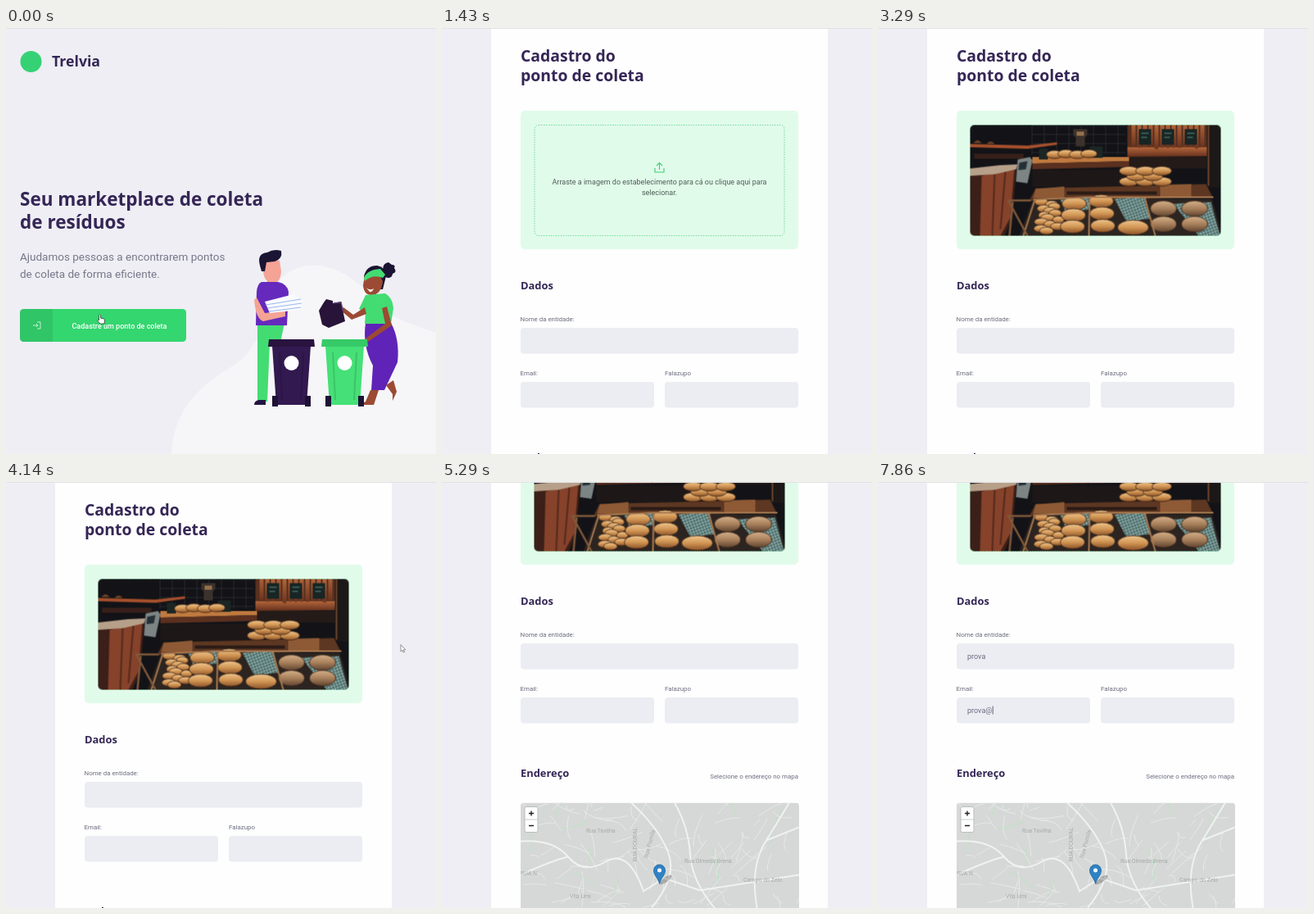
An HTML page for the animation above (8000 ms loop, 525x520 px).

```html
<!DOCTYPE html>
<html lang="pt">
<head>
<meta charset="utf-8">
<title>Ponto de coleta</title>
<style>
html, body { margin: 0; width: 100%; height: 100%; overflow: hidden; background: #eeeef4; }
svg { display: block; }
text { font-family: Roboto, sans-serif; }
.h { font-family: "Noto Sans", sans-serif; font-weight: 700; fill: #352656; }
.small { font-size: 7.9px; fill: #6c6c80; }
.field { fill: #ececf3; }
.typed { font-size: 9px; fill: #6c6c80; }
.street { font-size: 7px; fill: #a4aaa8; }
#home, #form, #scroll, #photo, #hand, #arrow { animation: 8s step-end infinite; }
#home { animation-name: home; }
#form { animation-name: form; }
#scroll { animation-name: scroll; }
#photo { animation-name: photo; }
#hand { animation-name: hand; }
#arrow { animation-name: arrow; }
@keyframes home { 0% { opacity: 1 } 3.5%, 100% { opacity: 0 } }
@keyframes form { 0% { opacity: 0 } 3.5%, 100% { opacity: 1 } }
@keyframes photo { 0% { opacity: 0 } 35.7%, 100% { opacity: 1 } }
@keyframes scroll {
  0% { transform: translateY(0) }
  12.4% { transform: translateY(-20px) }
  14.2% { transform: translateY(-58px) }
  16% { transform: translateY(-97px) }
  17.7% { transform: translateY(-113px) }
  58.8% { transform: translateY(-130px) }
  60.6% { transform: translateY(-172px) }
  62.4% { transform: translateY(-220px) }
  64.2% { transform: translateY(-264px) }
  66%, 100% { transform: translateY(-282px) }
}
@keyframes hand {
  0% { transform: translate(111px, 349px); opacity: 1 }
  1.7% { transform: translate(117px, 352px); opacity: 1 }
  5.3% { transform: translate(126px, 356px); opacity: 1 }
  7% { transform: translate(130px, 357px); opacity: 1 }
  17.7%, 100% { transform: translate(130px, 357px); opacity: 0 }
}
@keyframes arrow {
  0% { transform: translate(468px, 203px); opacity: 0 }
  49.9% { transform: translate(468px, 203px); opacity: 1 }
  51.6% { transform: translate(482px, 198px); opacity: 1 }
  58.8%, 100% { transform: translate(482px, 198px); opacity: 0 }
}
</style>
</head>
<body>
<svg width="525" height="520" viewBox="0 0 525 520">
<defs>
  <g id="brand">
    <circle cx="30.5" cy="41" r="13" fill="#35d275"/>
    <text class="h" x="56" y="47" font-size="17.7">Trelvia</text>
  </g>
  <clipPath id="photoClip"><rect width="306" height="135" rx="5"/></clipPath>
  <clipPath id="mapClip"><rect width="340" height="197" rx="4"/></clipPath>
  <pattern id="cloth" width="5" height="5" patternUnits="userSpaceOnUse" patternTransform="rotate(25)">
    <rect width="5" height="5" fill="#42605f"/><path d="M0 0h2.500v2.500h-2.500zM2.500 2.500h2.500v2.500h-2.500z" fill="#8fb0ab"/>
  </pattern>
  <pattern id="tiles" width="15" height="11" patternUnits="userSpaceOnUse">
    <path d="M0 .5h15M.5 0v11" stroke="#2b2c32" stroke-width=".8"/>
  </pattern>
  <linearGradient id="crust" x2="0" y2="1">
    <stop stop-color="#efc78f"/><stop offset=".5" stop-color="#d29654"/><stop offset="1" stop-color="#8a5228"/>
  </linearGradient>
  <linearGradient id="rye" x2="0" y2="1">
    <stop stop-color="#d3b08a"/><stop offset=".5" stop-color="#a8805b"/><stop offset="1" stop-color="#5e4330"/>
  </linearGradient>
  <linearGradient id="wood" x2="0" y2="1">
    <stop stop-color="#b3663a"/><stop offset="1" stop-color="#6b3420"/>
  </linearGradient>
</defs>
<rect width="525" height="520" fill="#eeeef4"/>

<g id="home">
  <path d="M202 520C204 468 236 436 276 413C322 386 314 324 341 301C376 274 424 298 450 333C470 357 500 362 525 372V520Z" fill="#f6f6f8"/>
  <use href="#brand"/>
  <text class="h" font-size="22.5"><tspan x="17" y="217">Seu marketplace de coleta</tspan><tspan x="17" y="245">de resíduos</tspan></text>
  <text font-size="13.5" fill="#77778a"><tspan x="17" y="284">Ajudamos pessoas a encontrarem pontos</tspan><tspan x="17" y="305">de coleta de forma eficiente.</tspan></text>
  <rect x="17" y="343" width="203" height="40" rx="4.5" fill="#34d66f"/>
  <path d="M57 343V383H21.500q-4.500 0-4.500-4.500V347.500q0-4.500 4.500-4.500z" fill="#000" opacity=".08"/>
  <path d="M38 359h4v8h-4M33 363h6M37 361l2 2l-2 2" fill="none" stroke="#fff" stroke-width=".9" opacity=".8"/>
  <text x="138.500" y="366.500" font-size="9" font-weight="500" fill="#fff" text-anchor="middle">Cadastre um ponto de coleta</text>

  <!-- man -->
  <path d="M307 360h33l-5 24h-13l-3 72h-12z" fill="#43dc73"/>
  <path d="M303 460q0-5 6-6h8v6z" fill="#241440"/>
  <path d="M319 303h10v12h-10z" fill="#e88a7a"/>
  <path d="M314 284h20l2 13q-1 14-9 14q-12 0-13-14z" fill="#f5a394"/>
  <path d="M310 290q-4-15 9-16q8-5 17-2q2 10-8 13l-10 1l-2 11h-4z" fill="#1b1433"/>
  <path d="M312 310h20q11 2 13 12l-2 41h-38l1-41q1-10 6-12z" fill="#6529bd"/>
  <path d="M306 329l10 19l25-3v7l-27 6q-9-3-11-26z" fill="#f5a394"/>
  <path d="M316 334l35-9l11 9l-3 10l-37 4z" fill="#fafbff"/>
  <path d="M317 338l43-7M319 342l42-6M321 346l39-5" stroke="#9ab8e8" stroke-width="1.200"/>

  <!-- woman -->
  <path d="M460 295q0-8 7-9l4 3q5 0 3 4q4 5-2 7q-1 7-9 4z" fill="#1b1433"/>
  <path d="M437 303q3-13 16-13q11 2 11 13l-4 16h-17z" fill="#1b1433"/>
  <path d="M438 302h18l4 7q-2 17-14 17q-9 0-10-12z" fill="#9c4a33"/>
  <path d="M437 305q4-10 20-11l6 7l-3 4q-12-5-22 4z" fill="#43dc73"/>
  <path d="M440 317q4 4 9 1q-2 5-5 4z" fill="#fff"/>
  <path d="M439 360h31q11 20 8 48l-16 34h-16l2-30q-13-24-9-52z" fill="#5f23b7"/>
  <path d="M445 442l-6 14l-7 4h17l6-18M464 436l8 11v8l5-11l-4-14" fill="#9c4a33"/>
  <path d="M439 326l24-2q9 5 10 18l-3 19h-32l1-14l-8-4z" fill="#43dc73"/>
  <path d="M438 341l-14 9l-12-9l-4 3l14 12l18-7z" fill="#9c4a33"/>
  <path d="M465 340l6 23l-29 20l-3-4l24-18l-4-19z" fill="#9c4a33"/>
  <path d="M382 345l6-10l3-4l8 2v3l10-2l5 24l-20 8l-8-4z" fill="#271438"/>
  <path d="M400 336l9 -1l3 13" fill="none" stroke="#5a3f72" stroke-width="1.500"/>

  <g id="bins"></g>
</g>

<g id="form"><g id="scroll">
  <use href="#brand"/>
  <path d="M427.500 41h7M430 38.500l-2.500 2.500l2.500 2.500" fill="none" stroke="#43d67b"/>
  <text x="514" y="44" text-anchor="end" font-size="9" font-weight="500" fill="#322153">Voltar para home</text>
  <rect x="60" y="98" width="411" height="1100" rx="4" fill="#fdfefd"/>
  <text class="h" font-size="19.4"><tspan x="96" y="154">Cadastro do</tspan><tspan x="96" y="178">ponto de coleta</tspan></text>
  <rect x="96" y="214" width="339" height="169" rx="5" fill="#e1fbea"/>
  <rect x="113" y="231.500" width="305" height="135" rx="5" fill="none" stroke="#62d795" stroke-dasharray="1.500 1.500" stroke-width=".9"/>
  <path d="M260 284v5h11v-5M265.500 286v-8M262 281l3.500-3.500l3.500 3.500" fill="none" stroke="#3ed077" stroke-width="1.100"/>
  <text font-size="9" fill="#4d5d56" text-anchor="middle"><tspan x="265.500" y="304">Arraste a imagem do estabelecimento para cá ou clique aqui para</tspan><tspan x="265.500" y="317">selecionar.</tspan></text>

  <g id="photo"><g transform="translate(112.500 231.500)" clip-path="url(#photoClip)">
    <rect width="306" height="135" fill="#131317"/>
    <rect x="75" width="115" height="36" fill="url(#tiles)"/>
    <!-- back wall -->
    <path d="M0 23l70 2l36-4v3l-36 5l-70-2z" fill="#a5502c"/>
    <path d="M4 22q5-7 10 0M20 23q5-6 10 0" fill="#6b4128"/>
    <path d="M5 35h60v6H5z" fill="#37201a"/>
    <path d="M126 5h17v7l-3 3v11h-11V15l-3-3z" fill="#3c322c"/><path d="M130 8h9v5h-9z" fill="#97714c"/>
    <path d="M76 39h118v5l-118 3z" fill="#c07a3f"/>
    <path d="M76 47l118-3v7l-118 3z" fill="#5b301f"/>
    <path d="M76 55h115v20H76z" fill="#1d1817"/>
    <!-- counter -->
    <path d="M0 57l57-9l-6 66l-9 21H0z" fill="#3b1f18"/>
    <path d="M14 62l40-9l-5 60l-12 22H12z" fill="#86422a"/>
    <path d="M30 59l-3 76M43 57l-6 70" stroke="#542a1d" stroke-width="2"/>
    <path d="M0 53l36-4l22-1l-2 6l-26 6l-30 2z" fill="#b7a08a"/>
    <path d="M58 42l15-3l3 4l-6 28l-14-2z" fill="#7c8484"/><path d="M60 46l10-2l-2 10l-9 1z" fill="#243036"/>
    <!-- baguette case -->
    <path d="M192 0h97v38l-97 1z" fill="#57301f"/>
    <path d="M192 27h97v11h-97z" fill="url(#wood)"/>
    <g id="sticks"></g>
    <path d="M289 0h17v76h-17z" fill="#1c1817"/><path d="M291 0v74" stroke="#65402b" stroke-width="2"/>
    <path d="M194 39h95v14h-95z" fill="#241a18"/>
    <!-- crates -->
    <path d="M80 77l98-2l110-3l8 16l-224 5z" fill="#5d3722"/>
    <path d="M80 78l35-3v14h-38zM232 73l38-1v16h-38z" fill="#8e5a35"/>
    <path d="M118 83h110" stroke="#2c1c16" stroke-width="4"/>
    <path d="M77 90h218l13 45H60z" fill="#2c2420"/>
    <path d="M110 91l35-4v16l-28 4zM176 90l38-2l6 26l-29 4zM248 96l46-2l11 41h-26z" fill="url(#cloth)"/>
    <g id="loaves"></g>
    <path d="M79 91l-14 44M146 88l-1 47M213 88l13 47M77 91l70-3h150" fill="none" stroke="#a9794f" stroke-width="2"/>
    <path d="M46 91l24 44M48 92h26M52 94l-4 41" fill="none" stroke="#80583a" stroke-width="2.500"/>
  </g></g>

  <text class="h" x="96" y="432" font-size="12.900">Dados</text>
  <text class="small" x="95.500" y="471">Nome da entidade:</text>
  <rect class="field" x="96" y="479" width="339" height="31.500" rx="4"/>
  <text class="small" x="95.500" y="537">Email:</text>
  <rect class="field" x="96" y="545" width="163" height="31.500" rx="4"/>
  <text class="small" x="272" y="537">Falazupo</text>
  <rect class="field" x="272" y="545" width="163" height="31.500" rx="4"/>
  <text class="typed" id="name" x="109" y="498"></text>
  <text class="typed" id="mail" x="109" y="564"></text>
  <rect id="caret" width=".9" height="10" fill="#55556a"/>
  <text class="h" x="96" y="642.300" font-size="12.900">Endereço</text>
  <text class="small" x="435" y="644" text-anchor="end">Selecione o endereço no mapa</text>

  <g transform="translate(96 673.500)" clip-path="url(#mapClip)">
    <rect width="340" height="197" fill="#d5d8d6"/>
    <g id="streets" fill="none" stroke="#e6e9e7"></g>
    <path d="M0 47Q40 44 58 66T104 72T150 108L175 92L219 107M188 0Q205 30 207 63T238 130M290 135Q278 80 300 46L328 0M300 46L340 30M135 0Q168 30 180 60T160 128M0 88Q40 70 58 66M219 107L340 88" fill="none" stroke="#f0f2f1" stroke-width="2"/>
    <g class="street">
      <text x="80" y="36">Rua Tavilha</text><text x="200" y="73">Rua Olmeda Brena</text>
      <text x="272" y="96">Campo do Zelo</text><text x="60" y="116">Vila Umi</text><text x="0" y="88">RUA N</text>
      <text transform="translate(142 72) rotate(-90)">RUA DOURAL</text><text transform="translate(155 68) rotate(-75)">Rua Pomila</text>
    </g>
    <ellipse cx="177" cy="94" rx="9" ry="3" transform="rotate(-35 177 94)" fill="#000" opacity=".22"/>
    <path d="M169.500 99C168 92 162.500 89 162.500 82.500a7 7 0 0 1 14 0C176.500 89 171 92 169.500 99z" fill="#2f82c4" stroke="#23699f" stroke-width=".8"/>
    <circle cx="169.500" cy="82.500" r="2.500" fill="#fff"/>
    <rect x="5" y="5" width="16" height="31" rx="2" fill="#fff" stroke="#b9bdbb"/>
    <path d="M5 20.500h16" stroke="#ccc"/>
    <path d="M10 13h6M13 10v6M10 28h6" stroke="#222" stroke-width="1.400"/>
  </g>
</g></g>

<g id="hand"><path d="M2.500 7V1.500q1-1.500 2 0V5l4 1q1.200.5 1 2L9 12H4L.800 8.500q0-1.500 1.700-1z" fill="#fff" stroke="#333" stroke-width=".8"/></g>
<g id="arrow"><path d="M0 .500v8.500l2-1.700l1.300 2.800l1.300-.6l-1.300-2.700h2.500z" fill="#fff" stroke="#777" stroke-width=".8"/></g>
<path d="M0 .5h525" stroke="#e2e2e6"/>
</svg>
<script>
const $ = id => document.getElementById(id);
const fill = (id, html) => { $(id).innerHTML = html; };

let seed = 11;
const rnd = () => (seed = seed * 16807 % 2147483647) / 2147483647;

const bin = (x, body, lid) => `<g transform="translate(${x} 380)">
  <path d="M5 8h47l-5 72H10z" fill="${body}"/>
  <path d="M1 0h55l1 9H0z" fill="${lid}"/>
  <path d="M14 16l3 58M43 16l-3 58" stroke="#000" opacity=".12" stroke-width="2"/>
  <path d="M5 69h7v13H5zM45 69h7v13h-7z" fill="#1d1235"/>
  <circle cx="28.500" cy="29" r="9" fill="#fff"/></g>`;
fill('bins', bin(320, '#32194f', '#29133f') + bin(385, '#45e077', '#36ca68'));

const loaf = (x, y, rx, ry, crust = 'crust') =>
  `<ellipse cx="${x}" cy="${y}" rx="${rx}" ry="${ry}" fill="url(#${crust})" stroke="#3b2417" stroke-width=".8"/>`;

let sticks = '';
for (let i = 0; i < 13; i++) {
  sticks += `<rect x="${197 + i * 7}" y="${-4 + rnd() * 4}" width="5" height="30" rx="2.500" fill="url(#wood)"/>`;
}
for (let i = 0; i < 3; i++) {
  const x = 206 + i * 28;
  sticks += `<path d="M${x} 5h15v19h-15z" fill="#182524"/><path d="M${x + 3} 10h9M${x + 3} 15h7" stroke="#579080"/>`;
}
fill('sticks', sticks);

let loaves = '<path d="M84 29h11v13H84zM146 26h16v14h-16z" fill="#1c2624"/>';
for (let i = 0; i < 4; i++) loaves += loaf(103 + i * 14, 36 - i % 2, 10, 5);
for (let row = 0; row < 3; row++) {
  for (let i = 0; i < 3 - row % 2; i++) loaves += loaf(194 + i * 20 + row % 2 * 9, 69 - row * 6.5, 12, 5.500);
}
// small rolls, then wider loaves basket by basket
for (let i = 0; i < 14; i++) {
  loaves += loaf(84 + i % 3 * 9 + rnd() * 8, 94 + i * 2.700, 7 + rnd() * 2, 4.500);
}
for (let row = 0; row < 3; row++) {
  loaves += loaf(127 - row, 96 + row * 14, 15, 8) + loaf(160 + row, 93 + row * 15, 15, 8);
}
loaves += loaf(199, 125, 19, 9);
for (let i = 0; i < 4; i++) loaves += loaf(236 + i % 2 * 38, 102 + (i >> 1) * 19, 16, 9.500, 'rye');
fill('loaves', loaves);

let streets = '';
for (let i = 0; i < 150; i++) {
  const x = rnd() * 340, y = rnd() * 197, a = rnd() * 6.28, len = 10 + rnd() * 34;
  const dx = Math.cos(a) * len, dy = Math.sin(a) * len, bend = rnd() * 16 - 8;
  const tone = i % 12 ? '' : ' stroke="#bfe3c5"';
  streets += `<path${tone} d="M${x} ${y}q${dx / 2 + bend} ${dy / 2 - bend} ${dx} ${dy}"/>`;
}
fill('streets', streets);

const fields = [
  { el: $('name'), word: 'prova', focus: 5600, keys: [5700, 5840, 5980, 6270, 6420] },
  { el: $('mail'), word: 'prova@', focus: 6700, keys: [6840, 6980, 7130, 7270, 7550, 7840] }
];

let start;
function draw(now) {
  start ??= now;
  const t = (now - start) % 8000;
  let active = null;
  for (const f of fields) {
    f.el.textContent = f.word.slice(0, f.keys.filter(k => t >= k).length);
    if (t >= f.focus) active = f.el;
  }
  const caret = $('caret');
  caret.style.opacity = active ? 1 : 0;
  if (active) {
    const w = active.textContent ? active.getComputedTextLength() : 0;
    caret.setAttribute('x', 109.4 + w);
    caret.setAttribute('y', active.getAttribute('y') - 8.5);
  }
  requestAnimationFrame(draw);
}
requestAnimationFrame(draw);
</script>
</body>
</html>
```
